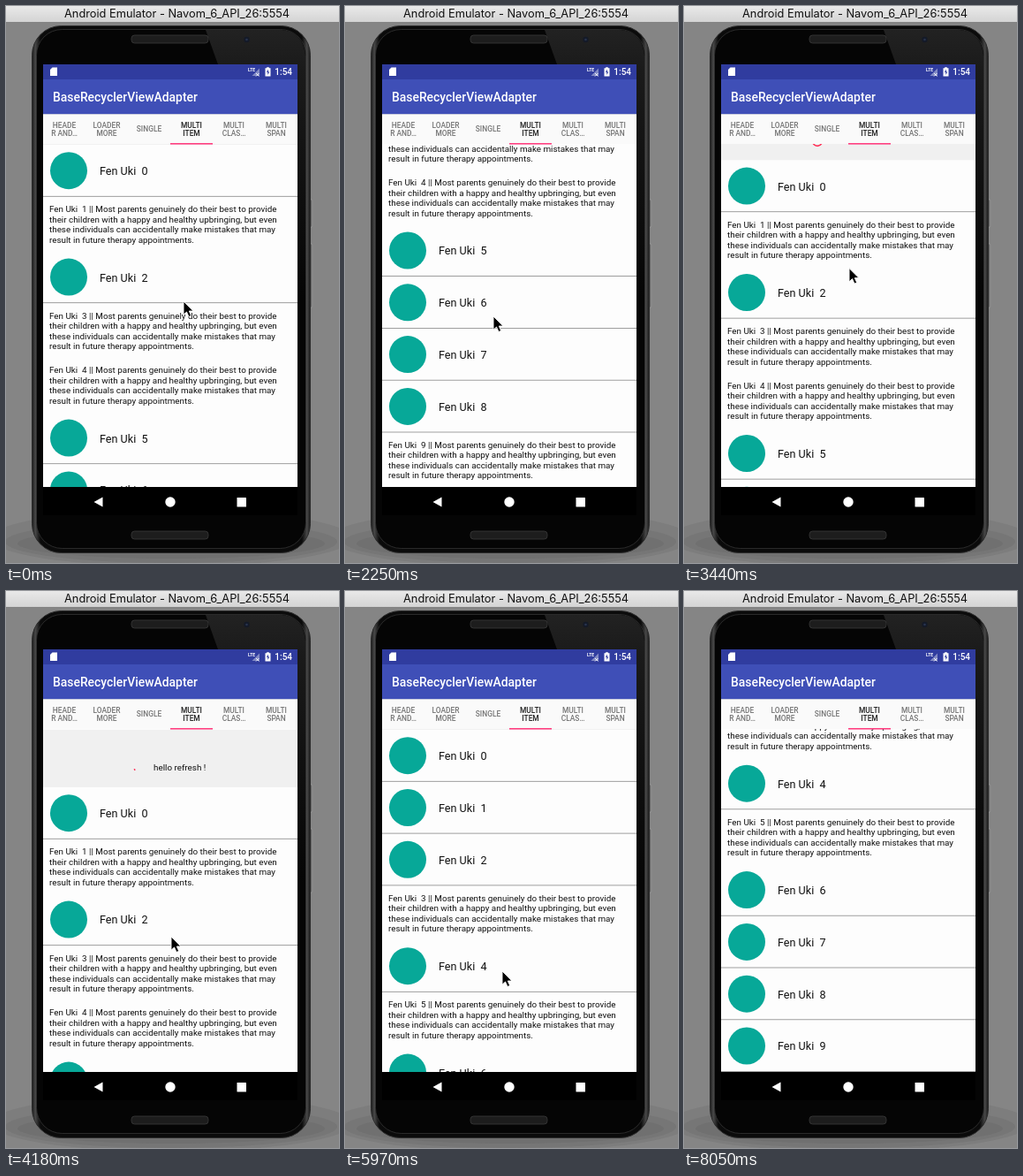
Write an HTML page that moves like this. It is 377 px wide and 630 px high and loops after 8350 ms.

```html
<!DOCTYPE html>
<html lang="en">
<head>
<meta charset="utf-8">
<title>List demo</title>
<style>
html, body { margin: 0; width: 100%; height: 100%; overflow: hidden; background: #858585; }
svg { display: block; width: 377px; height: 630px; }
text { font-family: Roboto, sans-serif; white-space: pre; }
.window { font: 12.8px Inter, sans-serif; fill: #111; }
.clock { font-size: 10px; font-weight: 500; fill: #fff; }
.title { font-size: 13.9px; font-weight: 500; fill: #fff; }
.tab { font-size: 8.4px; font-weight: 500; fill: #757575; text-anchor: middle; }
.tab.on { fill: #212121; }
.name { font-size: 12.6px; fill: #111; }
.body { font-size: 9.86px; fill: #111; }
</style>
</head>
<body>
<svg id="stage" viewBox="0 0 377 630" xmlns="http://www.w3.org/2000/svg">
  <defs>
    <linearGradient id="bar" x2="0" y2="1">
      <stop stop-color="#e9e9e9"/><stop offset="1" stop-color="#d4d4d4"/>
    </linearGradient>
    <linearGradient id="rim" x2="1" y2="0">
      <stop stop-color="#1a1a1a"/><stop offset=".012" stop-color="#484848"/><stop offset=".03" stop-color="#0b0b0b"/>
      <stop offset=".97" stop-color="#0b0b0b"/><stop offset=".988" stop-color="#484848"/><stop offset="1" stop-color="#1a1a1a"/>
    </linearGradient>
    <linearGradient id="gloss" x2="0" y2="1">
      <stop stop-color="#222"/><stop offset=".15" stop-color="#1a1a1a"/><stop offset="1" stop-color="#050505"/>
    </linearGradient>
    <clipPath id="view"><rect x="42" y="156" width="288" height="388"/></clipPath>
  </defs>

  <rect width="377" height="630" fill="#858585"/>
  <g fill="#4a4a4a" fill-opacity=".13">
    <ellipse cx="187" cy="602" rx="205" ry="32"/>
    <ellipse cx="187" cy="606" rx="188" ry="24"/>
    <ellipse cx="187" cy="608" rx="174" ry="17"/>
  </g>
  <rect width="377" height="18" fill="url(#bar)"/>
  <text class="window" x="66" y="13.3">Android Emulator - Navom_6_API_26:5554</text>

  <g fill="#696969" stroke="#a2a2a2" stroke-width=".7">
    <rect x="343" y="219" width="3.8" height="31" rx="1"/>
    <rect x="343" y="269" width="3.8" height="72" rx="1"/>
  </g>
  <rect x="29.5" y="22.5" width="315" height="596" rx="33" fill="url(#rim)" stroke="#2b2b2b"/>
  <rect x="34.5" y="26.5" width="305" height="587" rx="29" fill="#050505" stroke="#343434" stroke-width=".8"/>
  <path d="M226 27H312Q336 29 339 56V330H330L240 66Z" fill="url(#gloss)"/>
  <g fill="#1d1d1d" stroke="#3c3c3c" stroke-width=".8">
    <rect x="142" y="33" width="87" height="9" rx="3.5"/>
    <rect x="142" y="594" width="87" height="9" rx="3.5"/>
  </g>
  <circle cx="272.5" cy="38" r="3.2" fill="#141a28"/>
  <circle cx="272.5" cy="38" r="1.3" fill="#28344e"/>

  <rect x="42" y="66" width="288" height="510" fill="#000"/>
  <rect x="42" y="156" width="288" height="388" fill="#fdfdfd"/>
  <g clip-path="url(#view)">
    <g id="list">
      <rect x="42" y="91.9" width="288" height="65" fill="#f0f0f0"/>
      <text class="body" x="167" y="138">hello refresh !</text>
      <path id="spin" fill="none" stroke="#ff2d55" stroke-width="1.5"/>
    </g>
  </g>

  <rect x="42" y="66" width="288" height="17" fill="#303c9f"/>
  <rect x="42" y="83" width="288" height="39" fill="#3f4fb7"/>
  <g fill="#fff">
    <path d="M52.5 69.5H58V79H50V72Z"/>
    <path d="M287 70.500V79H278.500Z" opacity=".4"/>
    <path d="M283 76l3.500 3.500m0-3.500l-3.500 3.500" stroke="#fff" stroke-width=".9"/>
    <text x="274" y="73.5" font-size="5" font-weight="700">LTE</text>
    <path d="M295.200 69.300h2.600v1h1.700v9.200h-6v-9.200h1.700Z"/>
  </g>
  <path d="M297 71.500l-2 3.600h1.300v3l2-3.700h-1.300Z" fill="#303c9f"/>
  <text class="clock" x="304.3" y="78">1:54</text>
  <text class="title" x="53" y="107.5">BaseRecyclerViewAdapter</text>
  <rect x="42" y="122" width="288" height="34" fill="#fafafa"/>
  <rect x="42" y="122" width="288" height="1" fill="#c9cbdc"/>
  <g id="tabs"></g>
  <rect x="186" y="155" width="48" height="1.6" fill="#ff4081"/>

  <g fill="#fff">
    <path d="M99.500 561L109.500 555.500V566.500Z"/>
    <circle cx="186" cy="561" r="5.7"/>
    <rect x="261.5" y="556" width="10.5" height="10.5" rx=".6"/>
  </g>

  <path id="cursor" d="M0 0V15.200L3.500 12L6 17.500L8.700 16.300L6.300 11H11Z" fill="#000" stroke="#fff" stroke-width=".9"/>
</svg>
<script>
const LOOP = 8350, STEP = 149, RELOAD = 5080;
const TOP = 156.9, BOTTOM = 544, HEADER = 65;
const ICON_H = 58.8, TEXT_H = 61.6;
const NAME = 'Fen Uki';
const COPY = [
  'Most parents genuinely do their best to provide',
  'their children with a happy and healthy upbringing, but even',
  'these individuals can accidentally make mistakes that may',
  'result in future therapy appointments.'
];
const TABS = ['HEADE|R AND…', 'LOADER|MORE', 'SINGLE', 'MULTI|ITEM', 'MULTI|CLAS…', 'MULTI|SPAN'];

const $ = id => document.getElementById(id);
function add(parent, tag, attrs, text) {
  const el = document.createElementNS('http://www.w3.org/2000/svg', tag);
  for (const key in attrs) el.setAttribute(key, attrs[key]);
  if (text) el.textContent = text;
  return parent.appendChild(el);
}

TABS.forEach((label, i) => {
  const lines = label.split('|');
  lines.forEach((line, k) => add($('tabs'), 'text', {
    class: i === 3 ? 'tab on' : 'tab',
    x: 66 + 48 * i,
    y: 142.4 + (k - (lines.length - 1) / 2) * 9.8
  }, line));
});

// One letter per row: I = icon row, T = text row
function buildRows(kinds) {
  const group = add($('list'), 'g', {});
  let y = TOP;
  [...kinds].forEach((kind, i) => {
    const label = `${NAME}  ${i}`;
    if (kind === 'I') {
      add(group, 'circle', { cx: 71, cy: y + 29.3, r: 21, fill: '#07a898' });
      add(group, 'text', { class: 'name', x: 106, y: y + 34.2 }, label);
      add(group, 'rect', { x: 42, y: y + ICON_H - .8, width: 288, height: .8, fill: '#888' });
      y += ICON_H;
    } else {
      COPY.forEach((line, k) => add(group, 'text', { class: 'body', x: 49, y: y + 17.6 + 11.5 * k },
        k ? line : `${label} || ${line}`));
      y += TEXT_H;
    }
  });
  return { group, end: BOTTOM - y };
}
const before = buildRows('ITITTIIIIT');
const after = buildRows('IIITITIIII');

// Each move: start, end, then the values reached
const SCROLL = [
  [260, 1630, before.end], [2250, 2980, 0], [3280, 4180, HEADER],
  [RELOAD, 5360, 0], [5960, 6700, after.end]
];
const POINTER = [
  [300, 1050, 176, 314], [1050, 1630, 168, 351], [2250, 2980, 187, 278], [3280, 4180, 187, 392],
  [5660, 5960, 178, 430], [5960, 6700, 176, 363], [6860, 7300, 261, 468], [7460, 8050, 352, 662]
];
const linear = p => p;
const settle = p => 1 - (1 - p) ** 1.75;

function follow(moves, values, t, ease) {
  for (const [start, end, ...goal] of moves) {
    const p = ease(Math.min(1, Math.max(0, (t - start) / (end - start))));
    values = values.map((v, i) => v + (goal[i] - v) * p);
  }
  return values;
}

function arc(t) {
  const d = t - 4180, r = 5.8, rad = Math.PI / 180;
  const sweep = 20 + 250 * Math.sin(Math.PI * d / 1333) ** 2;
  const start = 150 + d * .27;
  const at = deg => `${151 + r * Math.cos(deg * rad)} ${134.9 + r * Math.sin(deg * rad)}`;
  return `M${at(start)}A${r} ${r} 0 ${sweep > 180 ? 1 : 0} 1 ${at(start + sweep)}`;
}

function draw(now) {
  const t = Math.floor(now / STEP) * STEP;
  const [shift] = follow(SCROLL, [0], t, settle);
  const [x, y] = follow(POINTER, [201, 334], t, linear);
  $('list').setAttribute('transform', `translate(0 ${shift})`);
  $('cursor').setAttribute('transform', `translate(${x} ${y})`);
  $('spin').setAttribute('d', arc(t));
  before.group.style.display = t < RELOAD ? '' : 'none';
  after.group.style.display = t < RELOAD ? 'none' : '';
}

const begin = performance.now();
function frame() {
  draw((performance.now() - begin) % LOOP);
  requestAnimationFrame(frame);
}
frame();
</script>
</body>
</html>
```
